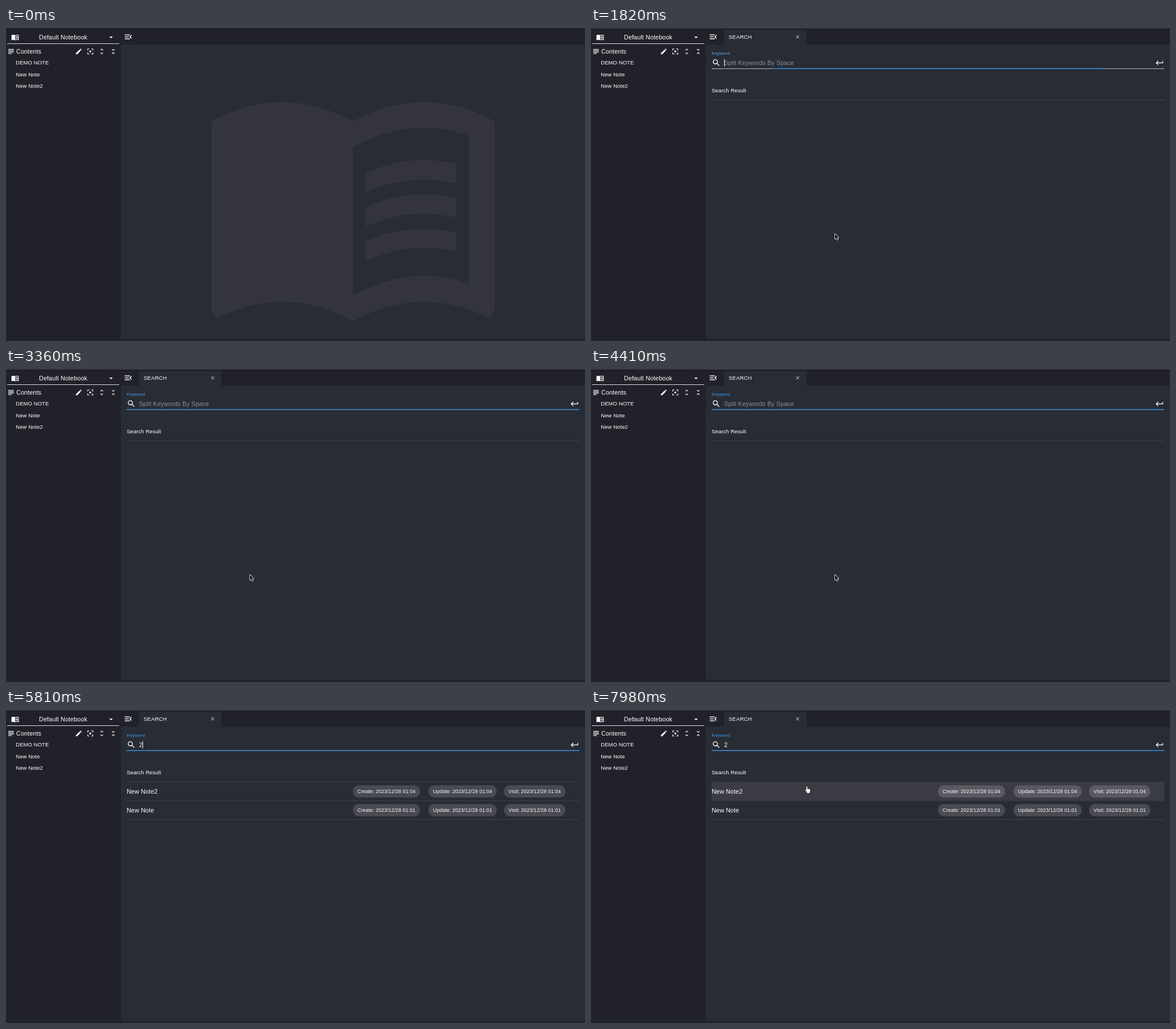
Animation of 1018x550 px, one loop 8000 ms. Source, as an HTML page with a canvas:

```html
<!DOCTYPE html>
<html lang="en">
<head>
<meta charset="utf-8">
<title>Notebook search</title>
<style>
html, body { margin: 0; width: 100%; height: 100%; overflow: hidden; background: #282c34; }
canvas { display: block; width: 1018px; height: 550px; }
</style>
</head>
<body>
<canvas id="stage"></canvas>
<script>
const W = 1018, H = 550, LOOP = 8000, STEP = 70, BLINK = 530;
const APPEAR = 210, OPEN = 1820, FOCUS = 1725, TYPED = 5320, RESULTS = 5810, RETURN = 6440, SLIDE = 7210;
const PANEL = '#21212a', PAGE = '#282c34', INK = '#fff', RULE = '#44474e', BLUE = [61, 155, 242];

const canvas = document.getElementById('stage');
const ctx = canvas.getContext('2d');
const ratio = window.devicePixelRatio || 1;
canvas.width = W * ratio;
canvas.height = H * ratio;

const clamp = x => Math.min(1, Math.max(0, x));
const mix = (a, b, k) => a + (b - a) * k;
const progress = (t, start, span) => clamp((t - start) / span);

function rect(x, y, w, h, color) {
  ctx.fillStyle = color;
  ctx.fillRect(x, y, w, h);
}

function text(str, x, y, size = 10.8, color = INK, spacing = 0.101) {
  ctx.font = `${size}px "Liberation Sans", Arial, sans-serif`;
  ctx.letterSpacing = spacing + 'px';
  ctx.fillStyle = color;
  ctx.fillText(str, x, y);
}

// Runs paint() with the origin at x, y
function place(x, y, scale, paint) {
  ctx.save();
  ctx.translate(x, y);
  ctx.scale(scale, scale);
  ctx.lineWidth = 2;
  ctx.strokeStyle = ctx.fillStyle = INK;
  paint();
  ctx.restore();
}

// A path through x, y pairs
function trace(...p) {
  ctx.beginPath();
  for (let i = 0; i < p.length; i += 2) ctx.lineTo(p[i], p[i + 1]);
}

function line(...p) {
  trace(...p);
  ctx.stroke();
}

function solid(...p) {
  trace(...p);
  ctx.fill();
}

function ring(x, y, r) {
  ctx.beginPath();
  ctx.arc(x, y, r, 0, 2 * Math.PI);
}

function chevrons(tail, tip) {
  for (const s of [-1, 1]) line(-3.9, s * tail, 0, s * tip, 3.9, s * tail);
}

// Icons on a 24 unit grid, centred on the origin
const icons = {
  drop() { solid(-5, -2, 5, -2, 0, 3); },
  menu() {
    for (const y of [-5, 0, 5]) line(-9, y, y ? 4 : 1, y);
    line(8.3, -4.3, 4, 0, 8.3, 4.3);
  },
  subject() {
    for (let y = -6; y <= 6; y += 4) line(-8, y, y < 6 ? 8 : 2, y);
  },
  edit() {
    solid(-9, 5.2, -9, 9, -5.2, 9, 5.8, -2.1, 2.1, -5.8);
    solid(3.1, -6.9, 5.6, -9, 9, -5.6, 6.9, -3.1);
  },
  focus() {
    ring(0, 0, 3);
    ctx.fill();
    for (let i = 0; i < 4; i++) {
      line(-8, -3, -8, -8, -3, -8);
      ctx.rotate(Math.PI / 2);
    }
  },
  expand() { chevrons(3.7, 7.6); },
  fold() { chevrons(7.3, 3.4); },
  close() { for (const s of [-1, 1]) line(-6.3, -6.3 * s, 6.3, 6.3 * s); },
  search() {
    ring(-2.5, -2.5, 5.5);
    ctx.stroke();
    line(1.6, 1.6, 7.7, 7.7);
  },
  enter() {
    line(8, -5, 8, 0, -8.6, 0);
    line(-3.3, -5.3, -8.6, 0, -3.3, 5.3);
  }
};
const icon = (name, x, y, scale) => place(x, y, scale, icons[name]);

// Open book: every edge follows the same arched page
function book(x, y, scale, color) {
  const arch = (u, base) => base - 1.5 * (1 - ((Math.abs(u) - 5.5) / 5.5) ** 2);
  const corner = u => {
    const d = 11 - Math.abs(u);
    return d < 0.5 ? 8.65 + Math.sqrt(0.25 - (0.5 - d) ** 2) : Infinity;
  };
  const strip = (from, to, top, bottom) => {
    const n = 88, at = i => mix(from, to, i / n);
    ctx.moveTo(from, arch(from, top));
    for (let i = 0; i <= n; i++) ctx.lineTo(at(i), arch(at(i), top));
    for (let i = n; i >= 0; i--) ctx.lineTo(at(i), Math.min(arch(at(i), bottom), corner(at(i))));
    ctx.closePath();
  };
  place(x, y, scale, () => {
    ctx.fillStyle = color;
    ctx.beginPath();
    strip(-11, 11, -6, 9.5);
    strip(0, 9, -4, 7.5);
    for (let i = 0; i < 3; i++) strip(1, 8, -1.5 + i * 2.66, i * 2.66);
    ctx.fill('evenodd');
  });
}

// cubic-bezier(0, 0, .2, 1)
function easeOut(x) {
  let lo = 0, hi = 1;
  for (let i = 0; i < 20; i++) {
    const s = (lo + hi) / 2;
    if (0.6 * (1 - s) * s * s + s ** 3 < x) lo = s; else hi = s;
  }
  return 3 * (1 - lo) * lo * lo + lo ** 3;
}

function sidebar() {
  rect(0, 0, 202, H, PANEL);
  book(16, 16.2, 0.58, INK);
  text('Default Notebook', 58, 20);
  icon('drop', 184.7, 16.2, 0.64);
  rect(2, 27, 197, 1, '#dcdcde');
  icon('subject', 8.8, 41.2, 0.61);
  text('Contents', 18, 45.2);
  ['edit', 'focus', 'expand', 'fold'].forEach((n, i) => icon(n, 128 + i * 20.2, 41.2, 0.5625));
  ['DEMO NOTE', 'New Note', 'New Note2'].forEach((s, i) => text(s, 17.3, 64.4 + i * 20.25, 9.45));
}

function searchPage(t) {
  const typed = t >= TYPED;
  const p = easeOut(progress(t, FOCUS + 20, 200));
  const tint = BLUE.map(c => Math.round(mix(190, c, p)));

  rect(234, 3, 145, 27, PAGE);
  text('SEARCH', 242, 19, 9.45, INK, 0.27);
  icon('close', 363.3, 15.6, 0.42);

  text('Keyword', 212.2, 47.4, 8.1, `rgb(${tint})`, 0.076);
  icon('search', 220.3, 61, 0.675);
  icon('enter', 999.7, 61.3, 0.675);
  if (typed) text('2', 234, 65);
  else text('Split Keywords By Space', 234, 65, 10.8, '#8d8f94');
  rect(212, 71, 796, 1, '#b8b9bc');
  rect(610 - 398 * p, 70.65, 796 * p, 1.35, `rgb(${BLUE})`);

  text('Search Result', 212.2, 113, 9.45);
  rect(212, 126, 796, 0.8, RULE);
  if (t >= RESULTS) {
    const hovered = hoveredRow(t);
    row('New Note2', '01:04', 143, hovered === 0);
    row('New Note', '01:01', 176, hovered === 1);
  }
  const blink = Math.floor((t - (typed ? TYPED : FOCUS)) / BLINK);
  if (blink % 2 === 0) rect(typed ? 240 : 234, 54.5, 0.9, 13.2, INK);
}

function row(name, clock, y, hover) {
  if (hover) rect(212, y - 17, 796, 33.8, '#3b3b44');
  else rect(212, y + 16, 796, 0.8, RULE);
  text(name, 212.2, y + 4);
  ['Create', 'Update', 'Visit'].forEach((label, i) => {
    const str = `${label}: 2023/12/28 ${clock}`, x = 610 + i * 132.75;
    ctx.font = '8.775px "Liberation Sans", Arial, sans-serif';
    ctx.letterSpacing = '0.101px';
    ctx.fillStyle = hover ? '#5a5a62' : '#494a52';
    ctx.beginPath();
    ctx.roundRect(x, y - 10.8, ctx.measureText(str).width + 16.2, 21.6, 10.8);
    ctx.fill();
    text(str, x + 8.1, y + 3.1, 8.775);
  });
}

function pointerAt(t) {
  if (t < RETURN) {
    const k = 1 - (1 - progress(t, APPEAR, 350)) ** 2;
    return [mix(474, 429, k), mix(470, 361.5, k)];
  }
  const u = progress(t, RETURN, 560);
  const x = mix(427, 394, u) - 25 * Math.sin(Math.PI * u);
  return [x - 17.5 * progress(t, SLIDE, 280), mix(353, 134.4, u ** 0.86)];
}

// The highlight trails the pointer by one step
function hoveredRow(t) {
  if (t < RETURN) return -1;
  const i = Math.floor((pointerAt(t - STEP)[1] - 126.5) / 33);
  return i < 2 ? i : -1;
}

function handShape() {
  const shape = new Path2D();
  shape.roundRect(2.1, 0.2, 1.9, 8, 0.9);
  shape.roundRect(2.1, 4.3, 6.6, 5.4, 1.4);
  shape.roundRect(3.1, 8, 4.9, 3.6, 0.4);
  shape.roundRect(0.3, 6, 2.8, 2, 0.9);
  return shape;
}
const hand = handShape();

function pointer(t) {
  if (t < APPEAR || (t > TYPED && t < RETURN)) return;
  place(...pointerAt(t), 1, () => {
    ctx.lineJoin = 'round';
    if (hoveredRow(t) >= 0) {
      ctx.lineWidth = 1;
      ctx.strokeStyle = '#15151a';
      ctx.stroke(hand);
      ctx.fill(hand);
    } else {
      ctx.lineWidth = 1.5;
      trace(0, 0, 0, 9.2, 2.1, 7.3, 3.6, 10.7, 5.2, 10, 3.7, 6.7, 6.4, 6.7);
      ctx.closePath();
      ctx.stroke();
      ctx.fillStyle = '#111';
      ctx.fill();
    }
  });
}

function draw(t) {
  ctx.setTransform(ratio, 0, 0, ratio, 0, 0);
  rect(0, 0, W, H, PAGE);
  rect(202, 0, W - 202, 29, PANEL);
  sidebar();
  icon('menu', 215, 15.6, 0.7);
  if (t < OPEN) book(610.1, 300, 22.64, '#34343f');
  else searchPage(t);
  rect(0, 0, W, 1.4, t < APPEAR ? '#2a2a30' : '#414143');
  rect(0, 1.4, W, 1.2, '#17171c');
  rect(202, 546.5, W - 202, 3.5, '#20212a');
  pointer(t);
}

function frame(now) {
  draw(Math.floor(now % LOOP / STEP) * STEP);
  requestAnimationFrame(frame);
}
requestAnimationFrame(frame);
</script>
</body>
</html>
```
